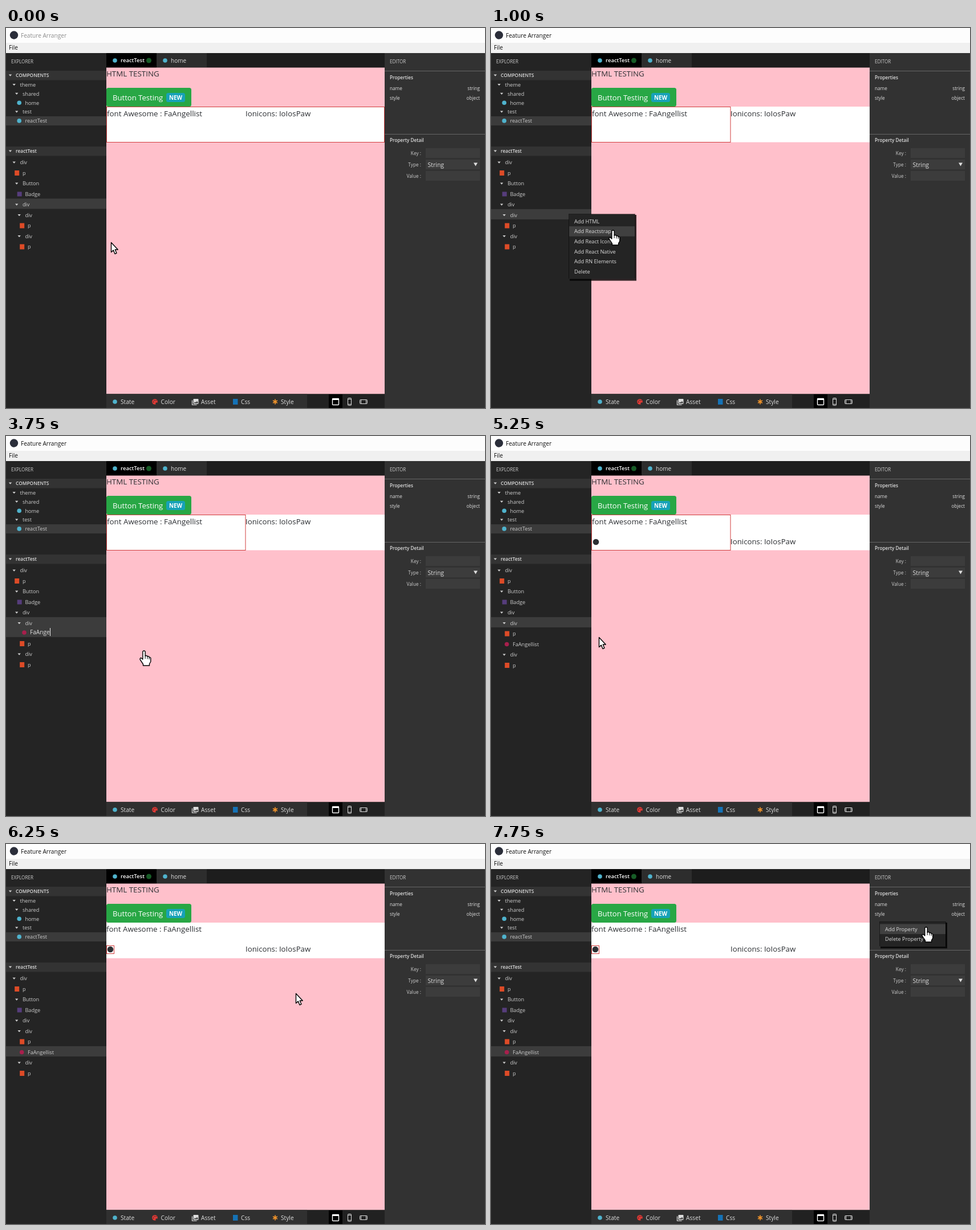
Animation of 840x667 px, one loop 8000 ms. Source, as an HTML page:

```html
<!DOCTYPE html>
<html lang="en">
<head>
<meta charset="utf-8">
<title>Component editor</title>
<style>
html, body { margin: 0; width: 100%; height: 100%; overflow: hidden; background: #242424; }
svg { display: block; width: 840px; height: 667px; font-family: "Open Sans", "Noto Sans", sans-serif; }
text { white-space: pre; }
</style>
</head>
<body>
<svg id="stage" viewBox="0 0 840 667"><g id="chrome"></g><g id="live"></g></svg>
<script>
const LOOP = 8000;
const RED = '#d03c3c', CYAN = '#4fb3cd', PINK = '#a81f4c', ORANGE = '#dd4b27';

// Each step overrides the state left by the one before it.
const steps = [
  { t: 0, pos: [184, 376], hand: false, focus: false, tree: 'base', sel: 4, box: 'outer', menu: null, hover: 0, typed: '', caret: true },
  { t: 250, pos: [158, 350] },
  { t: 500, pos: [137, 327], focus: true, sel: 5, box: 'inner' },
  { t: 750, pos: [175, 339], hand: true, menu: 'tree', hover: 0 },
  { t: 1000, pos: [214, 355], hover: 1 },
  { t: 1250, pos: [229, 368], hover: 2 },
  { t: 1500, pos: [242, 377] },
  { t: 1750, menu: null, tree: 'edit' },
  { t: 2250, caret: false },
  { t: 2750, caret: true, typed: 'F' },
  { t: 3000, typed: 'Fa' },
  { t: 3250, typed: 'FaA' },
  { t: 3500, typed: 'FaAn' },
  { t: 3750, typed: 'FaAnge' },
  { t: 4000, typed: 'FaAngell' },
  { t: 4250, typed: 'FaAngellist' },
  { t: 4500, tree: 'done' },
  { t: 5250, pos: [189, 353], hand: false },
  { t: 5500, pos: [96, 372], hand: true },
  { t: 5750, pos: [76, 363], sel: 7, box: 'icon' },
  { t: 6000, pos: [300, 298], hand: false },
  { t: 6250, pos: [508, 262] },
  { t: 6500, pos: [602, 206] },
  { t: 6750, pos: [668, 150] },
  { t: 7000, pos: [682, 137] },
  { t: 7250, pos: [702, 146], hand: true, menu: 'props', hover: 0 },
  { t: 7500, pos: [740, 155] },
  { t: 7750, pos: [763, 146] }
];
const states = [];
steps.forEach((step, i) => states.push({ ...states[i - 1], ...step }));

const rect = (x, y, w, h, fill, more = '') =>
  `<rect x="${x}" y="${y}" width="${w}" height="${h}" fill="${fill}" ${more}/>`;
const frame = (x, y, w, h, stroke, more = '') =>
  rect(x + .5, y + .5, w - 1, h - 1, 'none', `stroke="${stroke}" ${more}`);
const dot = (x, y, r, fill) => `<circle cx="${x}" cy="${y}" r="${r}" fill="${fill}"/>`;
const path = (d, more) => `<path d="${d}" ${more}/>`;
// Text is placed by the vertical middle of its capitals.
const label = (x, mid, size, str, fill = '#ccc', more = '') =>
  `<text x="${x}" y="${mid + size * .36}" font-size="${size}" fill="${fill}" ${more}>${str}</text>`;
const BOLD = 'font-weight="600"', END = 'text-anchor="end"';
const chevron = (x, y) => path(`M${x - 2.7} ${y - 1.5}h5.4l-2.7 3.2z`, 'fill="#d0d0d0"');

const icons = {
  open: chevron,
  html: (x, y) => rect(x - 3.5, y - 4.5, 8, 9, ORANGE),
  react: (x, y) => dot(x, y, 3.8, CYAN),
  pack: (x, y) => dot(x, y, 3.8, PINK),
  badge: (x, y) => rect(x - 3.5, y - 4, 8, 8, '#563d7c')
};

const node = ([depth, icon, name], y) =>
  icons[icon](14.2 + 4.5 * depth, y) + label(24.4 + 4.5 * depth, y, 9.2, name);

const files = [[0, 'open', 'theme'], [1, 'open', 'shared'], [2, 'react', 'home'], [1, 'open', 'test'], [2, 'react', 'reactTest']];
const elements = [
  [0, 'open', 'div'], [1, 'html', 'p'], [1, 'open', 'Button'], [2, 'badge', 'Badge'], [1, 'open', 'div'],
  [2, 'open', 'div'], [3, 'html', 'p'], [2, 'open', 'div'], [3, 'html', 'p']
];
const withIcon = [...elements.slice(0, 7), [3, 'pack', 'FaAngellist'], ...elements.slice(7)];
const rowY = i => 236 + 18.5 * i;

const menus = {
  tree: { x: 137, y: 327, items: ['Add HTML', 'Add Reactstrap', 'Add React Icons', 'Add React Native', 'Add RN Elements', 'Delete'] },
  props: { x: 682, y: 137, items: ['Add Property', 'Delete Property'] }
};

function drawChrome() {
  const section = (y, name) => rect(0, y - 8, 176, 16.5, '#333') + chevron(7.5, y) + label(17, y, 8.4, name, '#ddd', BOLD);
  const field = (y, name) => label(728, y + .5, 8.3, name + ' :', '#ccc', END) + rect(736, y - 9, 95, 17, '#3c3c3c');
  const prop = (y, name, type) => label(673, y, 8.2, name, '#ddd') + label(831, y, 8.2, type, '#ddd', END);
  const tool = (x, name) => label(x, 656, 10.2, name, '#ddd');

  const bars = rect(0, 0, 840, 26, '#fdfdfd') + rect(0, 26, 840, 18, '#f0f0f0') +
    dot(14, 12.5, 7.2, '#2b2e3a') + label(5, 34.5, 10.1, 'File', '#111');

  const left = rect(0, 44, 176, 623, '#242424') + label(9, 59.5, 8.1, 'EXPLORER') +
    section(83, 'COMPONENTS') + rect(0, 155, 176, 16, '#3b3b3b') +
    files.map((f, i) => node(f, 99.5 + 15.85 * i)).join('') + section(216, 'reactTest');

  const tabs = rect(176, 44, 488, 25.5, '#1d1d1d') + rect(176, 44, 88, 25.5, '#000') + rect(264, 44, 88, 25.5, '#2d2d2d') +
    icons.react(191, 57) + label(201, 57, 9.5, 'reactTest', '#fff', BOLD) + dot(250.5, 57, 4.5, '#175c27') +
    icons.react(279, 57) + label(289, 57, 10, 'home', '#ddd');

  const page = rect(176, 69.5, 488, 573, '#ffc0cb') + label(176, 80.5, 13.35, 'HTML TESTING', '#2c2f33') +
    rect(176, 105, 149, 33, '#28a745', 'rx="3.5"') + label(187, 122, 13.1, 'Button Testing', '#fff') +
    rect(281, 114, 33, 16, '#17a2b8', 'rx="3.5"') + label(297.5, 122, 9.9, 'NEW', '#fff', 'font-weight="700" text-anchor="middle"') +
    rect(176, 138, 488, 62.5, '#fff');

  const asterisk = [0, 60, 120].map(a =>
    path('M472 651.5v9', `stroke="#f0932b" stroke-width="1.8" transform="rotate(${a} 472 656)"`)).join('');
  const palette = dot(261, 656, 4.8, '#e53935') + dot(264, 659, 1.8, '#303030') +
    [[258.6, 656.5], [260, 653.6], [263, 653.8]].map(([x, y]) => dot(x, y, .9, '#303030')).join('');
  const picture = path('M326.5 653.5v8h8', 'fill="none" stroke="#ddd" stroke-width="1.2"') +
    rect(328.5, 651, 9, 9, '#ddd', 'rx="1"') + path('M329.5 658.5l2-2.5 1.5 1.5 2-2.8 2 3.8z', 'fill="#303030"');
  const bottom = rect(176, 642.5, 488, 24.5, '#212121') + rect(176, 642.5, 352, 24.5, '#303030') +
    icons.react(191, 656) + tool(201, 'State') + palette + tool(271.5, 'Color') + picture + tool(342, 'Asset') +
    rect(398, 651, 8.5, 10, '#1572b6') + tool(412, 'Css') + asterisk + tool(482, 'Style') +
    rect(566, 643, 24, 24, '#000') +
    frame(572, 650, 12, 12, '#fff', 'stroke-width="1.4" rx="1"') + rect(572, 650, 12, 3, '#fff') +
    frame(599, 649, 7, 14, '#ddd', 'rx="1"') + path('M600 651.5h5M600 660.5h5', 'stroke="#ddd"') +
    frame(620, 652, 14, 8, '#ddd', 'rx="1"') + path('M622.5 653v6M631.5 653v6', 'stroke="#ddd"');

  const right = rect(664, 44, 176, 623, '#323232') + label(673, 59.5, 8.1, 'EDITOR') +
    rect(664, 75, 176, 1, '#666') + label(673, 87, 8.2, 'Properties', '#ddd', BOLD) +
    prop(106, 'name', 'string') + prop(123, 'style', 'object') +
    rect(664, 186, 176, 1, '#666') + label(673, 197.5, 8.2, 'Property Detail', '#ddd', BOLD) +
    field(220, 'Key') + field(240, 'Type') + field(260, 'Value') +
    label(739.5, 240, 10.5, 'String', '#ddd') + path('M820 236.5h7l-3.5 6z', 'fill="#ddd"');

  return bars + left + tabs + page + bottom + right;
}

function drawTree({ tree, sel, typed, caret }) {
  const editing = tree === 'edit';
  const rows = tree === 'done' ? withIcon : elements;
  let out = rect(0, rowY(sel) - 10.6, 176, editing ? 35 : 18, '#3c3c3c');
  rows.forEach((row, i) => { out += node(row, rowY(i) + (editing && i > sel ? 17.5 : 0)); });
  if (editing) {
    out += icons.pack(32, 345) + label(42, 344.5, 10.15, typed, '#ddd', 'id="entry"');
    if (caret) out += rect(42, 337, 1, 14, '#eee', 'id="caret"');
  }
  return out;
}

function drawPage({ tree, box }) {
  const done = tree === 'done', shift = box === 'icon' ? 0 : 1;
  const ink = '#2c2f33';
  let out = label(176 + shift, 149 + shift, 13.35, 'font Awesome : FaAngellist', ink) +
    label(420, (done ? 184 : 149) + shift, 13.25, 'Ionicons: IoIosPaw', ink);
  if (done) out += dot(183 + shift, 185 + shift, 5.3, '#2c2f33');
  const [x, y, w, h] = { outer: [176, 138, 488, 63], inner: [176, 138, 244.5, 63], icon: [176, 178, 14, 15] }[box];
  return out + frame(x, y, w, h, RED);
}

function drawMenu({ menu, hover }) {
  if (!menu) return '';
  const { x, y, items } = menus[menu], pitch = 17.6, h = items.length * pitch + 8;
  return rect(x + 1, y + 1, 117, h + 2, '#000', 'opacity=".8"') + rect(x - 1, y - 1, 117, h, '#000', 'opacity=".5"') +
    rect(x, y, 115, h, '#242424') + rect(x, y + 3.5 + hover * pitch, 115, pitch, '#404040') +
    items.map((item, i) => label(x + 9, y + 12.4 + i * pitch, 9.2, item, '#ddd')).join('');
}

function drawPointer({ pos: [x, y], hand }) {
  const d = hand
    ? 'M-2.2 15V2Q-2 0 0 0T2.2 2V9Q5.6 7.5 6 10Q9 9 9.2 11.5Q11.8 11 11.8 13.5V19L9.5 23V26H-1.5V23.5L-6.8 15.5Q-7.5 12.5-5 12.5Z'
    : 'M.5 .5V17.5L4.3 14L7 20.5L10 19.2L7.3 13H12.2Z';
  const fingers = hand ? path('M2.2 8v6M6 10v4.5M9.2 11.5v3.5', 'stroke="#000" fill="none"') : '';
  return `<g transform="translate(${x} ${y})">` +
    path(d, 'fill="#fff" stroke="#000" stroke-width="1.4" stroke-linejoin="round"') + fingers + '</g>';
}

const live = document.getElementById('live');
function draw(state) {
  live.innerHTML = label(26, 13, 10.1, 'Feature Arranger', state.focus ? '#111' : '#8c8c8c') +
    drawTree(state) + drawPage(state) + drawMenu(state) + drawPointer(state);
  const entry = document.getElementById('entry'), caret = document.getElementById('caret');
  if (entry && caret) caret.setAttribute('x', Math.round(42 + entry.getComputedTextLength()));
}

document.getElementById('chrome').innerHTML = drawChrome();
const start = performance.now();
let shown = null;
function tick() {
  const t = (performance.now() - start) % LOOP;
  const state = states.findLast(s => s.t <= t) || states[0];
  if (state !== shown) draw(shown = state);
  requestAnimationFrame(tick);
}
tick();
</script>
</body>
</html>
```
